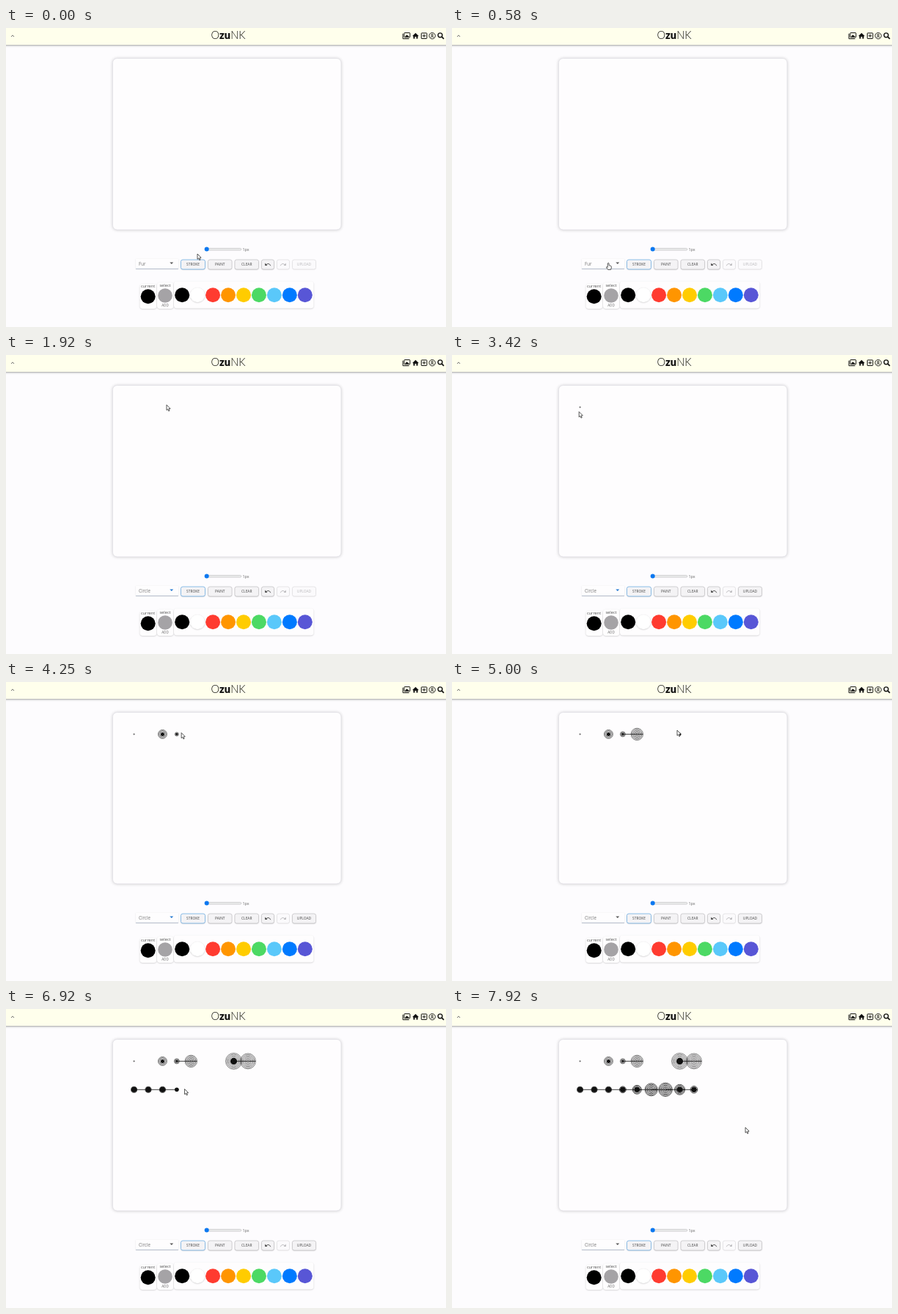
An HTML page with a canvas that plays this animation: 600 by 409 pixels, repeating every 8000 ms.

```html
<!DOCTYPE html>
<html lang="en">
<head>
<meta charset="utf-8">
<title>Sketch board</title>
<style>
html, body { margin: 0; width: 100%; height: 100%; overflow: hidden; background: #fdfcfe; }
canvas { display: block; width: 600px; height: 409px; }
</style>
</head>
<body>
<canvas id="stage"></canvas>
<script>
const W = 600, H = 409, LOOP = 8000, STEP = 1000 / 12;
const canvas = document.getElementById('stage');
const c = canvas.getContext('2d');
const dpr = window.devicePixelRatio || 1;
canvas.width = Math.round(W * dpr);
canvas.height = Math.round(H * dpr);

const SANS = '"Open Sans", "Noto Sans", sans-serif';
const OPEN = 660, PICK = 1410, FIRST_DOT = 3250, BLUR = 4910;
const INK = '#111', CARD = '#fefdfe';

// Pointer key points: time, x, y of the tip
const path = [
  [0, 261, 309], [OPEN, 207, 323], [1160, 200, 372], [PICK, 200, 372],
  [1917, 219, 68], [2400, 173, 70], [3083, 174, 84], [3500, 173, 76],
  [3917, 209, 71], [5000, 307, 66], [5400, 350, 80], [6050, 176, 120],
  [6250, 171, 110], [7500, 307, 109], [7833, 412, 157], [7917, 400, 162]
];

// Outer ring size by column; the first row has gaps where the pen was up
const firstRow = { 0: .7, 2: 6, 3: 3.5, 4: 8.2, 7: 11, 8: 10.5 };
const secondRow = col => 4 + 5.4 * Math.exp(-(((col - 5.7) / 1.7) ** 2));

const swatches = ['#000', '#fff', '#ff3b30', '#ff9500', '#ffcc00', '#4cd964', '#5ac8fa', '#007aff', '#5856d6'];
const clamp = v => Math.max(0, Math.min(1, v));
const mix = (a, b, k) => a + (b - a) * k;

function paint(fill, line, weight = 1) {
  if (fill) { c.fillStyle = fill; c.fill(); }
  if (line) { c.strokeStyle = line; c.lineWidth = weight; c.stroke(); }
}

function box(x, y, w, h, r, fill, line, weight = .6) {
  c.beginPath();
  c.roundRect(x, y, w, h, r);
  paint(fill, line, weight);
}

function circle(x, y, r, fill, line, weight) {
  c.beginPath();
  c.arc(x, y, r, 0, Math.PI * 2);
  paint(fill, line, weight);
}

function poly(points, fill, line, weight) {
  c.beginPath();
  points.forEach(([x, y]) => c.lineTo(x, y));
  if (fill) c.closePath();
  paint(fill, line, weight);
}

function shadow(alpha, blur, dy, draw) {
  c.save();
  c.shadowColor = `rgba(0,0,0,${alpha})`;
  c.shadowBlur = blur * dpr;
  c.shadowOffsetY = dy * dpr;
  draw();
  c.restore();
}

function at(x, y, draw) {
  c.save();
  c.translate(x, y);
  draw();
  c.restore();
}

function text(str, x, y, size, color, align = 'left') {
  c.font = `${size}px ${SANS}`;
  c.textAlign = align;
  c.fillStyle = color;
  c.fillText(str, x, y);
}

function wordmark() {
  const parts = [['O', 300], ['zu', 900], ['NK', 300]];
  const font = weight => `${weight} 14.6px Lato, Inter, sans-serif`;
  const widths = parts.map(([s, w]) => { c.font = font(w); return c.measureText(s).width; });
  let x = 303 - widths.reduce((a, b) => a + b) / 2;
  c.textAlign = 'left';
  c.fillStyle = INK;
  parts.forEach(([s, w], i) => {
    c.font = font(w);
    c.fillText(s, x, 14.6);
    x += widths[i];
  });
}

function icons() {
  at(546, 10.7, () => { // gallery
    poly([[-4.8, -3], [-4.8, 4], [3.6, 4]], null, INK);
    box(-3, -4.1, 7.9, 6.2, .6, null, INK, 1);
    poly([[-2, 1.2], [.5, -1.4], [4, 1.2]], INK);
  });
  at(558.5, 10.7, () => { // home
    poly([[-4.3, .4], [0, -3.9], [4.3, .4]], INK);
    c.fillRect(-3, 0, 2, 3.9);
    c.fillRect(1, 0, 2, 3.9);
    c.fillRect(-3, 0, 6, 1.2);
  });
  at(570.1, 10.7, () => { // add
    box(-3.8, -3.8, 7.6, 7.6, .6, null, INK, 1);
    poly([[-2.3, 0], [2.3, 0]], null, INK, .9);
    poly([[0, -2.3], [0, 2.3]], null, INK, .9);
  });
  at(581.2, 10.7, () => { // account
    circle(0, 0, 4.2, null, INK, .9);
    circle(0, -1.2, 1.2, null, INK, .9);
    c.beginPath();
    c.arc(0, 4.1, 3, Math.PI * 1.2, Math.PI * 1.8);
    c.stroke();
  });
  at(592, 9.8, () => { // search
    circle(0, 0, 2.9, null, INK, 1.4);
    poly([[2.1, 2.1], [5, 5]], null, INK, 1.7);
  });
}

function header() {
  shadow(.5, 3, .8, () => { c.fillStyle = '#ffffec'; c.fillRect(-5, -5, W + 10, 28); });
  poly([[7, 12], [9, 9.8], [11, 12]], null, '#555', .8);
  wordmark();
  icons();
}

const looks = {
  plain: { ink: '#444', fill: '#f4f3f5', line: '#c4c3c6', depth: .28 },
  on: { ink: '#444', fill: '#f4f3f5', line: '#62a9e6', depth: .28 },
  off: { ink: '#b8b7ba', fill: '#fbfafc', line: '#dedde0', depth: .1 }
};

function button(x, w, label, look = looks.plain) {
  shadow(look.depth, 1.5, .6, () => box(x, 317, w, 13, 2.5, look.fill));
  box(x, 317, w, 13, 2.5, null, look.line, .7);
  text(label, x + w / 2, 325.3, 4.9, look.ink, 'center');
}

function turnArrow(x, dir, color) {
  at(x, 323.6, () => {
    c.scale(dir, 1);
    poly([[-3.8, -2], [-3.8, 1.3], [-.6, 1.3]], color);
    c.beginPath();
    c.moveTo(-2.6, .2);
    c.quadraticCurveTo(1.7, -3, 3.8, 1.6);
    paint(null, color, .9);
  });
}

function controls(t) {
  box(272, 301.4, 48.8, 2.6, 1.3, '#efeff0', '#b2b2b4');
  circle(273.7, 302.6, 3, '#0a78f0');
  text('1px', 322.4, 305, 5.4, '#666');

  const focus = t >= PICK && t < BLUR;
  shadow(.12, 2, .5, () => box(177, 315.5, 58, 14, 1, CARD));
  c.fillStyle = '#9fadbf';
  c.fillRect(177, 329, 58, .7);
  text(t < PICK ? 'Fur' : 'Circle', 181, 324.8, 6.2, '#777');
  poly([[223.4, 320.6], [228.2, 320.6], [225.8, 323]], focus ? '#1c74d0' : '#555');

  button(238.5, 33, 'STROKE', looks.on);
  button(275.5, 32.5, 'PAINT');
  button(312, 32.5, 'CLEAR');
  button(348.5, 17, '');
  turnArrow(357, 1, looks.plain.ink);
  button(369.5, 17, '', looks.off);
  turnArrow(378, -1, looks.off.ink);
  button(390.5, 32, 'UPLOAD', t >= FIRST_DOT ? looks.plain : looks.off);
}

function palette() {
  const card = (x, y, w, h) => shadow(.18, 2, .8, () => box(x, y, w, h, 4, CARD));
  card(182.5, 350, 23, 34);
  card(206, 348, 22.5, 36);
  card(229, 346.5, 190.5, 37);
  text('current', 193.6, 355, 5.7, '#555', 'center');
  text('select', 217, 354.2, 5.7, '#555', 'center');
  text('ADD', 217, 381, 4.6, '#666', 'center');
  circle(193.7, 367.3, 10, '#000');
  circle(217, 366, 9.8, '#a5a3a6');
  swatches.forEach((color, i) => {
    shadow(i === 1 ? .2 : 0, 2, .6, () => circle(240.2 + i * 20.95, 365.2, 10, color));
  });
}

function board() {
  shadow(.22, 4, .2, () => box(145.5, 41.5, 311.5, 234.5, 6, CARD));
  box(145.5, 41.5, 311.5, 234.5, 6, null, '#e4e3e8', .9);
}

// Concentric rings that spread from the centre of a grid cell
function stamp(col, row, outer, joined, solid, age) {
  if (age < 0) return;
  const x = 174.6 + col * 19.42, y = 71.4 + row * 38.9;
  const reach = outer * mix(.15, 1, clamp(age / 160));
  const gap = .6 + outer * .1;
  if (joined) poly([[x - 19.4, y], [x + reach, y]], null, INK, .8);
  if (solid) circle(x, y, Math.min(solid, reach), INK);
  for (let r = outer; r > solid; r -= gap) {
    if (r <= reach) circle(x, y, r, null, INK, row ? .75 : .55);
  }
}

function drawing(t) {
  for (let col = 0; col < 9; col++) {
    const size = firstRow[col];
    if (size) {
      const joined = col === 4 || col === 8;
      const start = col ? 3490 + col * 215 : FIRST_DOT;
      stamp(col, 0, size, joined, joined ? 0 : size * .42, t - start);
    }
    const wide = secondRow(col);
    stamp(col, 1, wide, col > 0, wide > 8 ? 0 : 3.8, t - 6330 - col * 165);
  }
}

function menu(t) {
  const k = t < PICK ? clamp((t - OPEN) / 200) : 1 - clamp((t - PICK) / 160);
  if (k <= 0) return;
  const picked = t < PICK ? 2 : 3;
  const hover = t > 1060 ? 3 : 2;
  at(206, 350, () => {
    c.globalAlpha = k;
    c.scale(mix(.85, 1, k), mix(.75, 1, k));
    shadow(.45, 5, 1.5, () => box(-29, -35.5, 58, 68.5, 1.5, CARD));
    ['NormalPen', 'Shaded', 'Fur', 'Circle'].forEach((name, i) => {
      const y = -32.6 + i * 15.6;
      if (i === picked || i === hover) {
        c.fillStyle = i === picked ? '#d9eaf8' : '#f3f2f4';
        c.fillRect(-29, y, 58, 15.6);
      }
      text(name, -23.2, y + 9.4, 4.7, i === picked ? '#5595cf' : '#777');
    });
  });
}

function arrowShape() {
  poly([[0, 0], [0, 7.3], [1.6, 5.9], [2.8, 8.5], [4, 8], [2.9, 5.4], [5.1, 5.2], [0, 0]], '#fff', '#222', .75);
}

function handShape() {
  c.beginPath();
  c.moveTo(-1, 6);
  c.lineTo(-1, .6);
  c.quadraticCurveTo(0, -1, .8, .6);
  c.lineTo(.8, 3.4);
  c.quadraticCurveTo(4.6, 3.8, 4.2, 5.5);
  c.lineTo(3.3, 9.2);
  c.lineTo(-.6, 9.2);
  c.lineTo(-3, 5.9);
  c.quadraticCurveTo(-2.7, 4.6, -1, 6);
  c.closePath();
  paint('#fff', '#222', .75);
}

function pointer(t) {
  const next = Math.max(1, path.findIndex(p => p[0] > t));
  const last = t >= path.at(-1)[0];
  const [t0, x0, y0] = path[last ? path.length - 1 : next - 1];
  const [t1, x1, y1] = path[last ? path.length - 1 : next];
  const k = last ? 0 : (t - t0) / (t1 - t0);
  at(mix(x0, x1, k), mix(y0, y1, k), t > 490 && t < 1590 ? handShape : arrowShape);
}

function draw(now) {
  // The board updates twelve times a second
  const t = Math.floor((now % LOOP + 4) / STEP) * STEP % LOOP;
  c.setTransform(dpr, 0, 0, dpr, 0, 0);
  c.lineJoin = 'round';
  c.fillStyle = '#fdfcfe';
  c.fillRect(0, 0, W, H);
  header();
  board();
  drawing(t);
  controls(t);
  palette();
  menu(t);
  pointer(t);
}

const begin = performance.now();
function tick() {
  draw(performance.now() - begin);
  requestAnimationFrame(tick);
}
tick();
</script>
</body>
</html>
```
